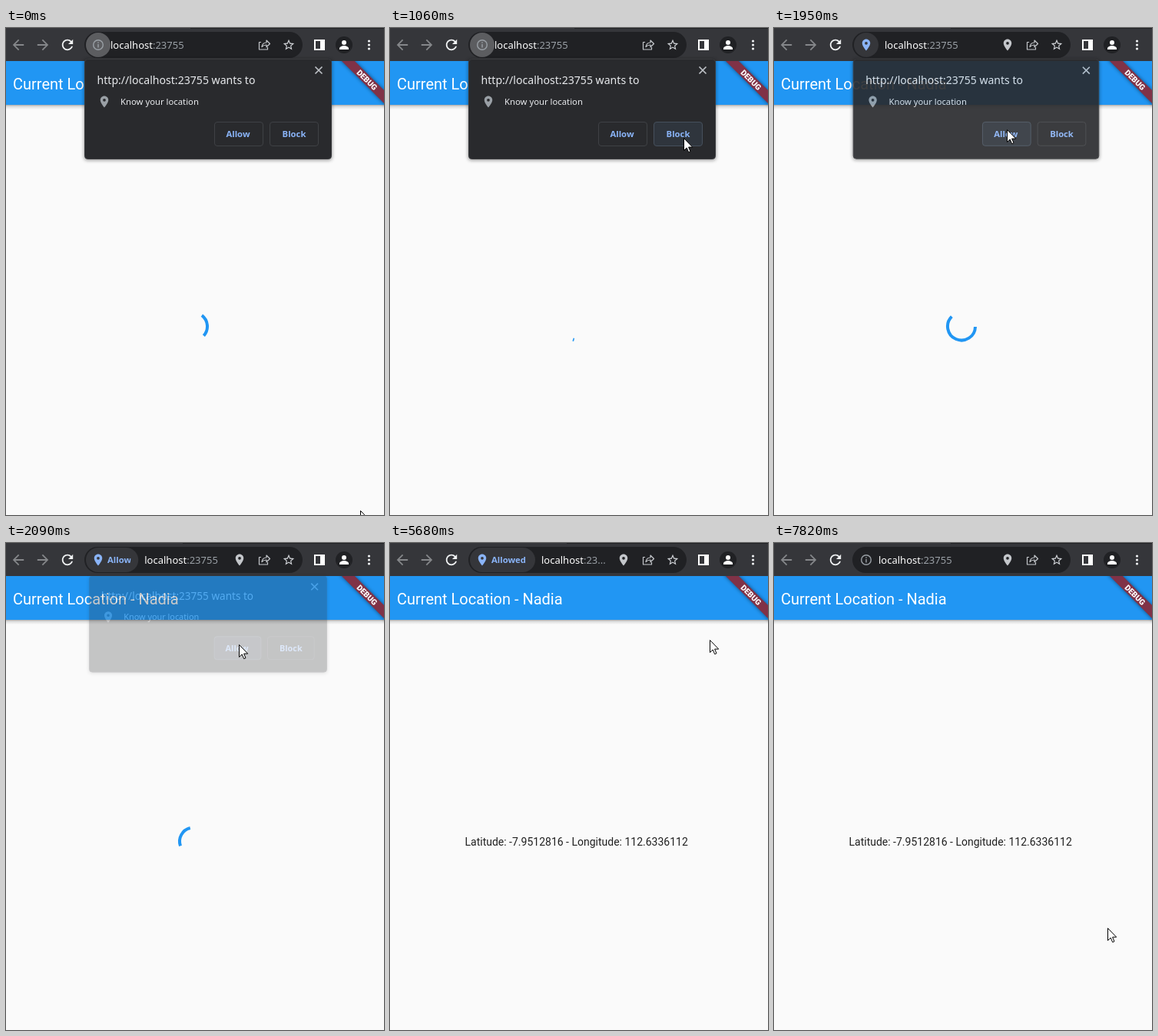
Recreate the animation shown at these times as an HTML page. Size 492 by 634 pixels, loop 8000 ms.

```html
<!DOCTYPE html>
<html lang="en">
<head>
<meta charset="utf-8">
<title>Current Location</title>
<style>
html, body { margin: 0; width: 100%; height: 100%; overflow: hidden; background: #fafafa; }
svg { display: block; }
text { white-space: pre; }
.ui { font-family: "Noto Sans", "Open Sans", sans-serif; }
.app { font-family: Roboto, sans-serif; }
.small { font-size: 11.3px; }
.strong { font-weight: 600; fill: #8ab4f8; }
.button { stroke: #3f4145; fill: #292a2d; }
.button.hover { fill: #2f353d; stroke: #46505c; }
</style>
</head>
<body>
<svg width="492" height="634" viewBox="0 0 492 634">
  <defs>
    <path id="pin" transform="translate(-12 -12)" d="M12 2C8.13 2 5 5.13 5 9c0 5.25 7 13 7 13s7-7.75 7-13c0-3.87-3.13-7-7-7zm0 9.5a2.5 2.5 0 0 1 0-5 2.5 2.5 0 0 1 0 5z"/>
    <path id="back" transform="translate(-12 -12)" d="M20 11H7.83l5.59-5.59L12 4l-8 8 8 8 1.41-1.41L7.83 13H20z"/>
    <path id="reload" transform="translate(-12 -12)" d="M17.65 6.35C16.2 4.9 14.21 4 12 4c-4.42 0-7.99 3.58-7.99 8s3.57 8 7.99 8c3.73 0 6.84-2.55 7.73-6h-2.08c-.82 2.33-3.04 4-5.65 4-3.31 0-6-2.69-6-6s2.69-6 6-6c1.66 0 3.14.69 4.22 1.78L13 11h7V4z"/>
    <path id="star" transform="translate(-12 -12)" d="M22 9.24l-7.19-.62L12 2 9.19 8.63 2 9.24l5.46 4.73L5.82 21 12 17.27 18.18 21l-1.63-7.03zM12 15.4l-3.76 2.27 1-4.28-3.32-2.88 4.38-.38L12 6.1l1.71 4.04 4.38.38-3.32 2.88 1 4.28z"/>
    <linearGradient id="shade" x2="0" y2="1">
      <stop stop-color="#000" stop-opacity=".32"/>
      <stop offset=".35" stop-color="#000" stop-opacity=".12"/>
      <stop offset="1" stop-color="#000" stop-opacity="0"/>
    </linearGradient>
    <filter id="blur" x="-20%" y="-60%" width="140%" height="220%"><feGaussianBlur stdDeviation="2.5"/></filter>
    <clipPath id="page"><path d="M0 43H492V634H0z"/></clipPath>
    <clipPath id="chipClip"><rect id="chipMask" x="104" y="6" width="32" height="32"/></clipPath>
  </defs>

  <rect width="492" height="634" fill="#fafafa"/>

  <g class="app" clip-path="url(#page)">
    <rect y="100" width="492" height="6" fill="url(#shade)"/>
    <rect y="43" width="492" height="57" fill="#2196f3"/>
    <text x="9" y="80" font-size="20" fill="#fff">Current Location - Nadia</text>
    <g transform="translate(494 43.5) rotate(45)">
      <rect x="-44" y="28" width="88" height="12" fill="#000" opacity=".5" filter="url(#blur)"/>
      <rect x="-44" y="28" width="88" height="12" fill="#803247"/>
      <text y="37.7" text-anchor="middle" font-size="10.2" font-weight="900" fill="#fff">DEBUG</text>
    </g>
    <path id="spinner" fill="none" stroke="#2196f3" stroke-width="4"/>
    <text id="coords" x="97.5" y="394" font-size="14" fill="#212121">Latitude: -7.9512816 - Longitude: 112.6336112</text>
  </g>

  <g id="toolbar">
    <rect width="492" height="43" fill="#35363a"/>
    <rect id="tabEdge" height="1" width="492" fill="#202124"/>
    <use href="#back" fill="#85878a" transform="translate(16 22) scale(.9)"/>
    <use href="#back" fill="#85878a" transform="translate(48 22) scale(-.9 .9)"/>
    <use href="#reload" fill="#f1f3f4" transform="translate(80 22) scale(.9)"/>
    <rect x="102" y="5" width="284" height="34" rx="17" fill="#202124"/>
    <rect id="chip" x="104" y="6" width="32" height="32" rx="16"/>
    <g id="info" fill="none" stroke="#9aa0a6" stroke-width="1.4">
      <circle cx="120" cy="22" r="6.3"/>
      <path d="M120 21v4.5M120 18.2v1.6"/>
    </g>
    <g id="allowed">
      <use href="#pin" fill="#8ab4f8" transform="translate(120 22) scale(.75)"/>
      <g clip-path="url(#chipClip)"><text class="ui small strong" x="132" y="26">Allowed</text></g>
    </g>
    <text id="url" class="ui" y="27" font-size="13" fill="#fff">localhost<tspan id="port" fill="#9aa0a6">:23755</tspan></text>
    <use id="sitePin" href="#pin" fill="#c4c7cb" transform="translate(304 22) scale(.75)"/>
    <path d="M332 18.5h-2.5v9.500h11v-3M333 24.500c.5-3.500 3-5.500 6-5.500v-3l4.500 4.500-4.500 4.300v-2.800c-2.500 0-4.500.8-6 2.500z" fill="none" stroke="#c4c7cb" stroke-width="1.200" stroke-linejoin="round"/>
    <use href="#star" fill="#d0d3d7" transform="translate(368 22) scale(.72)"/>
    <path d="M401 15h14v14h-14zM403 17v10h6V17z" fill="#fff" fill-rule="evenodd"/>
    <circle cx="440" cy="22" r="11" fill="#202124"/>
    <circle cx="440" cy="19" r="3" fill="#fff"/>
    <path d="M434 28v-1.500c0-2.300 4-3.500 6-3.500s6 1.200 6 3.500V28z" fill="#fff"/>
    <g fill="#f1f3f4">
      <circle cx="472.500" cy="17" r="1.600"/><circle cx="472.500" cy="22" r="1.600"/><circle cx="472.500" cy="27" r="1.600"/>
    </g>
  </g>

  <g id="dialog" class="ui">
    <rect x="102" y="41" width="322" height="131" rx="4" fill="#000" opacity=".45" filter="url(#blur)"/>
    <rect x="102.500" y="40.500" width="321" height="130" rx="4" fill="#292a2d" stroke="#3a3b3e"/>
    <path d="M402.500 50.500l9 9m0-9l-9 9" stroke="#bdc1c6" stroke-width="1.700"/>
    <text x="118.500" y="73" font-size="14.100" fill="#e8eaed">http://localhost:23755 wants to</text>
    <use href="#pin" fill="#9aa0a6" transform="translate(128 96) scale(.75)"/>
    <text class="small" x="149" y="100" fill="#e8eaed">Know your location</text>
    <rect id="allow" class="button" x="271.500" y="122.500" width="63" height="31" rx="3.500"/>
    <rect id="block" class="button" x="343.500" y="122.500" width="63" height="31" rx="3.500"/>
    <text class="small strong" x="302" y="142" text-anchor="middle">Allow</text>
    <text class="small strong" x="375" y="142" text-anchor="middle">Block</text>
  </g>

  <path id="cursor" d="M.5.5V16.500L4.200 13 6.700 18.700 9 17.700 6.600 12.100H11.700z" fill="#fff" stroke="#000"/>
</svg>

<script>
const LOOP = 8000;
const $ = id => document.getElementById(id);
const clamp = v => Math.min(1, Math.max(0, v));
const show = (id, on) => $(id).setAttribute('visibility', on ? 'visible' : 'hidden');
const set = (id, name, value) => $(id).setAttribute(name, value);

// Screen updates come in bursts: start, end, number of updates.
const bursts = [
  [0, 0, 1], [70, 120, 2], [270, 1060, 13], [1130, 1890, 12],
  [1950, 2410, 8], [5680, 6070, 6], [6800, 7550, 12], [7620, 7820, 4]
];

// Pointer runs of time, x, y; it is hidden outside them.
const runs = [
  [[0, 461, 628], [70, 467, 520], [120, 454, 390], [270, 447, 325], [660, 405, 47],
   [930, 384, 138], [1060, 382, 143], [1130, 378, 144], [1500, 303, 132],
   [2090, 303, 132], [2300, 467, 70]],
  [[5680, 416, 126], [6000, 298, 50], [6735, 298, 50], [7550, 404, 381],
   [7820, 434, 501], [LOOP, 434, 501]]
];

function snap(t) {
  const [start, end, count] = bursts.filter(b => b[0] <= t).pop();
  if (count < 2) return start;
  const step = (end - start) / (count - 1);
  return start + Math.min(count - 1, Math.floor((t - start) / step + 1e-6)) * step;
}

function pointerAt(t) {
  const run = runs.find(r => t >= r[0][0] && t <= r[r.length - 1][0]);
  if (!run) return null;
  const i = Math.max(1, run.findIndex(k => k[0] >= t));
  const [t0, x0, y0] = run[i - 1], [t1, x1, y1] = run[i];
  const p = (t - t0) / (t1 - t0);
  return [Math.round(x0 + (x1 - x0) * p), Math.round(y0 + (y1 - y0) * p)];
}

// cubic-bezier(.4, 0, .2, 1)
function fastOutSlowIn(x) {
  x = clamp(x);
  let lo = 0, hi = 1;
  for (let i = 0; i < 24; i++) {
    const s = (lo + hi) / 2;
    const bx = 1.2 * s * (1 - s) ** 2 + 0.6 * s * s * (1 - s) + s ** 3;
    if (bx < x) lo = s; else hi = s;
  }
  return 3 * lo * lo * (1 - lo) + lo ** 3;
}

function drawSpinner(t) {
  const phase = (t / 1333 + 0.147) % 1;
  const head = 270 * fastOutSlowIn(phase * 2);
  const tail = 270 * fastOutSlowIn(phase * 2 - 1);
  const start = -66 + t / 2150 * 360 + tail + phase * 90;
  const sweep = Math.max(head - tail, 5);
  const point = deg => {
    const a = deg * Math.PI / 180;
    return `${244 + 18 * Math.cos(a)} ${388.5 + 18 * Math.sin(a)}`;
  };
  set('spinner', 'd', `M${point(start)}A18 18 0 ${+(sweep > 180)} 1 ${point(start + sweep)}`);
}

function drawAddress(t) {
  const granted = t >= 1950 && t < 6060;
  const open = 1 - (1 - clamp((t - 1950) / 300)) ** 2;
  const close = clamp((t - 5680) / 320) ** 2;
  const width = 32 + 53 * (open - close);
  const x = granted ? 112 + width : 136;
  set('chip', 'width', width);
  set('chip', 'fill', granted ? '#35363a' : '#5c5d60');
  set('chipMask', 'width', width - 10);
  show('chip', t < 6060);
  show('info', !granted);
  show('allowed', granted);
  show('sitePin', t >= 1950);
  set('url', 'x', x);
  $('port').textContent = x > 191 ? ':23...' : x > 186 ? ':237...' : ':23755';
  set('tabEdge', 'x', t < 1890 ? 240 : 230);
}

function drawDialog(t, pointer) {
  const alpha = 1 - clamp((t - 1932) / 200);
  const scale = 1 - 0.05 * (1 - alpha);
  show('dialog', alpha > 0);
  set('dialog', 'opacity', alpha);
  set('dialog', 'transform', `translate(263 105.5) scale(${scale}) translate(-263 -105.5)`);
  for (const [id, left] of [['allow', 271], ['block', 343]]) {
    const over = pointer && pointer[0] >= left && pointer[0] <= left + 64 &&
      pointer[1] >= 122 && pointer[1] <= 154;
    $(id).classList.toggle('hover', !!over);
  }
}

function draw(now) {
  const t = snap(now % LOOP);
  const pointer = pointerAt(t);
  const loaded = t > 2400;
  show('spinner', !loaded);
  show('coords', loaded);
  if (!loaded) drawSpinner(t);
  drawAddress(t);
  drawDialog(t, pointer);
  show('cursor', pointer);
  if (pointer) set('cursor', 'transform', `translate(${pointer})`);
}

const began = performance.now();
function tick() {
  draw(performance.now() - began);
  requestAnimationFrame(tick);
}
tick();
</script>
</body>
</html>
```
